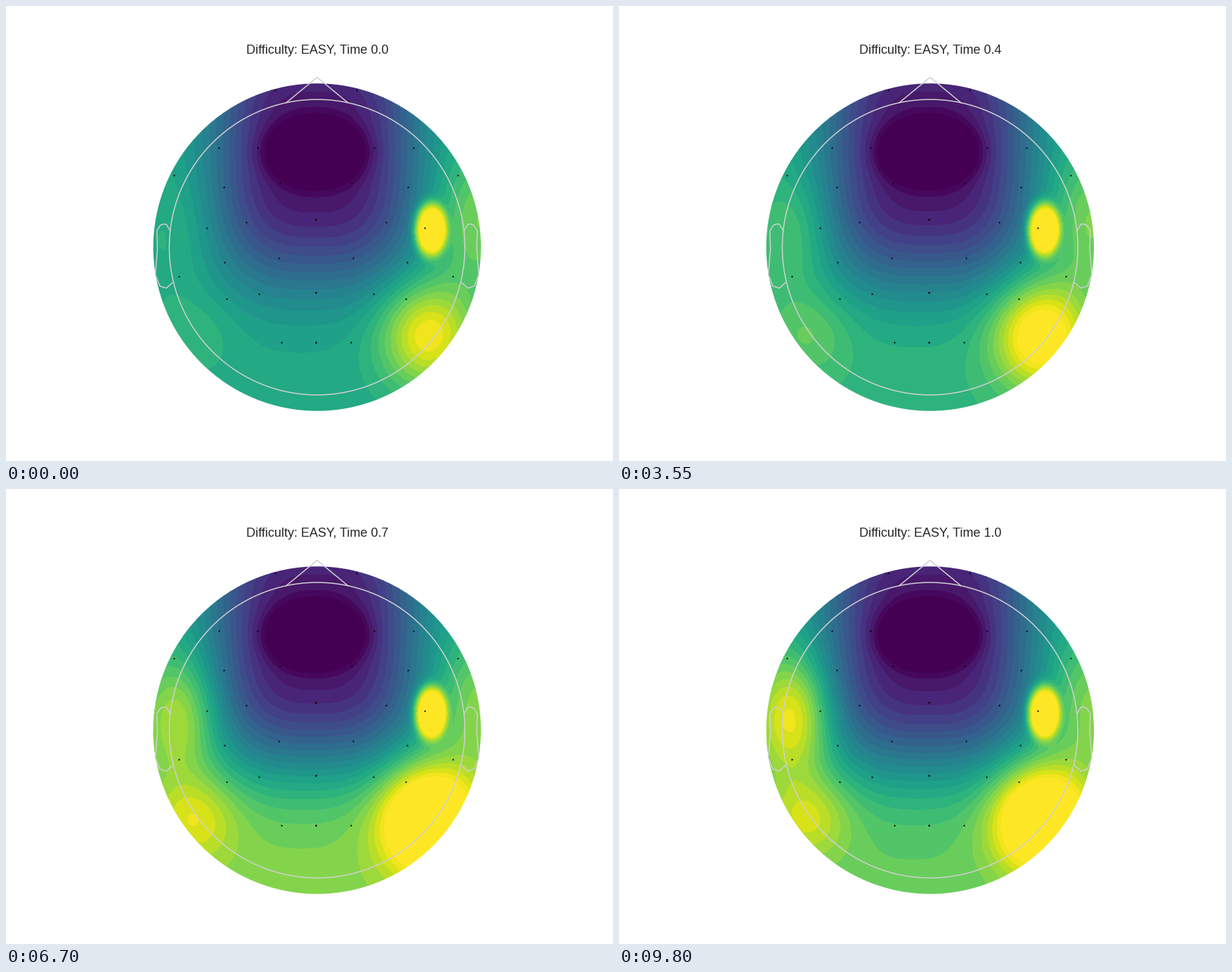
These frames come from a looping animation (864 px wide and 648 px high, 10000 ms). A matplotlib script:

```python
import numpy as np
import matplotlib.pyplot as plt
from matplotlib.animation import FuncAnimation
from matplotlib.patches import Circle

W, H, DPI = 864, 648, 72
LOOP, STEP = 10000, 50
CX, CY = 442.8, 343.5
R_MAP, R_HEAD = 233.2, 210.4
GREY = "#d0d0d0"
BANDS = 24

# Electrodes: mirrored pairs as (row, offsets from the midline)
MIDLINE = 441
ROWS = [(120, [58]), (202, [83, 138.5]), (240.5, [202]), (252, [51]),
        (257.5, [131]), (304, [0]), (308, [99.5]), (316, [155]),
        (359, [53]), (365, [130]), (384.5, [195]), (408, [0]),
        (410, [81.5]), (417, [127.5]), (479, [0, 49.5])]

# The map refreshes about every 105 ms inside these spans, and rests between
BURSTS = [(250, 1200), (1450, 2400), (2500, 3500), (3550, 4550), (4750, 5750),
          (5900, 6700), (6950, 7900), (8100, 9050), (9300, 9800)]

# Rise and fall of the level at the back of the head
KEYS = [0, 2500, 3550, 4850, 6700, 8150, 9800]
REAR = [0, 0, .25, .55, 1, .60, .75]


def refresh_times():
    times = [0]
    for a, b in BURSTS:
        ticks = np.linspace(a, b, round((b - a) / 105) + 1)
        times.extend(np.round(ticks / STEP) * STEP)
    return np.array(times)


def ease(u):
    u = np.clip(u, 0, 1)
    return u * u * (3 - 2 * u)


gx = np.linspace(CX - R_MAP - 2, CX + R_MAP + 2, 200)
gy = np.linspace(CY - R_MAP - 2, CY + R_MAP + 2, 200)
mx, my = np.meshgrid(gx, gy)


def bump(x, y, w, h, power=1):
    r2 = ((mx - x) / w) ** 2 + ((my - y) / h) ** 2
    return np.exp(-r2 ** power)


# A boxy bowl around the frontal minimum, with a deeper core
bowl_r = (np.abs(mx - 440) ** 3 + np.abs(.77 * (my - 208)) ** 3) ** (1 / 3)
bowl = .03 + .57 * (1 - np.exp(-(bowl_r / 145) ** 3))
core = bump(440, 208, 74, 49, 2)
right_temple = bump(604, 318, 23, 38, 2)
right_rim = bump(672, 305, 60, 95)
right_back = bump(600, 468, 66, 74)
left_temple = bump(247, 322, 54, 85)
left_back = bump(270, 466, 60, 60)
rear = 1 / (1 + np.exp(-(my - 410) / 45))

still = bowl - .25 * core + .62 * right_temple + .20 * right_rim


def field(t):
    swell = np.interp(t, KEYS, REAR)
    rise = ease(t / 8500)
    left = .05 + .30 * (t / LOOP) ** 1.5 + .06 * swell
    return (still + .22 * swell * rear + left * left_temple
            + (.40 + .20 * rise) * right_back
            + (.06 + .14 * rise) * left_back)


LEVELS = np.linspace(0, 1, BANDS + 1)
MIDS = (np.arange(BANDS) + .5) / BANDS
COLORS = plt.get_cmap("viridis")(np.concatenate([[0], MIDS, [1]]))

fig = plt.figure(figsize=(W / DPI, H / DPI), dpi=DPI, facecolor="white")
ax = fig.add_axes([0, 0, 1, 1])
ax.set(xlim=(0, W), ylim=(H, 0))
ax.axis("off")
rim = Circle((CX, CY), R_MAP, transform=ax.transData)


def outline(x, y):
    """Line in head radii, y pointing up."""
    ax.plot(CX + R_HEAD * np.asarray(x), CY - R_HEAD * np.asarray(y),
            color=GREY, lw=1.5, zorder=3)


turn = np.linspace(0, 2 * np.pi, 181)
outline(np.cos(turn), np.sin(turn))
outline([-.209, 0, .209], [.978, 1.15, .978])
ear_x = np.array([.994, 1.02, 1.036, 1.06, 1.084, 1.08, 1.094, 1.064, 1.02, .978])
ear_y = np.array([.111, .155, .157, .149, .111, -.011, -.186, -.263, -.277, -.24])
outline(ear_x, ear_y)
outline(-ear_x, ear_y)

for y, offsets in ROWS:
    for dx in offsets:
        ax.plot([MIDLINE - dx, MIDLINE + dx], [y, y], "o", color="black",
                ms=2.2, mew=0, zorder=4)

title = ax.text(CX + .2, 68, "", ha="center", va="baseline", fontsize=18,
                family="Liberation Sans", color="#262626")

changes = refresh_times()
shown = contours = None


def show(t):
    global shown, contours
    if t == shown:
        return
    if contours is not None:
        contours.remove()
    contours = ax.contourf(gx, gy, field(t), levels=LEVELS, colors=COLORS,
                           extend="both", zorder=1)
    contours.set_clip_path(rim)
    ax.set(xlim=(0, W), ylim=(H, 0))
    title.set_text(f"Difficulty: EASY, Time {t / LOOP:.1f}")
    shown = t


def update(i):
    show(changes[changes <= i * STEP][-1])
    return []


def init():
    show(0)
    return []


anim = FuncAnimation(fig, update, frames=LOOP // STEP, init_func=init,
                     interval=STEP, repeat=True, repeat_delay=0, blit=False)
plt.show()
```
